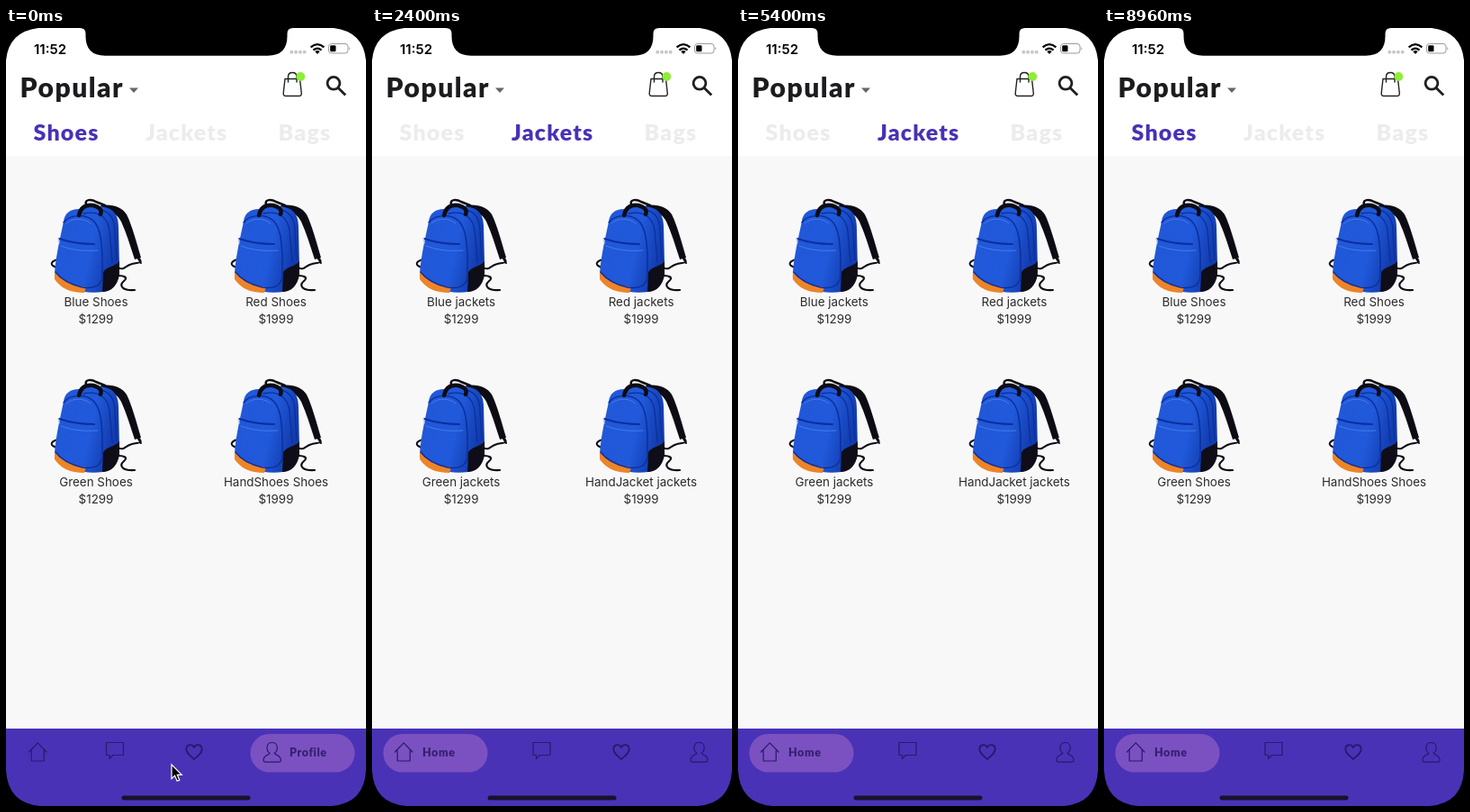
An HTML page for the animation above (9 s loop, 400 px wide and 864 px high).

```html
<!DOCTYPE html>
<html lang="en">
<head>
<meta charset="utf-8">
<title>Shop app</title>
<style>
  html, body { margin: 0; width: 100%; height: 100%; overflow: hidden; background: #000; }
  svg { display: block; width: 100%; height: 100%; }
  .head { font-family: Lato, "Open Sans", sans-serif; font-weight: 900; letter-spacing: 1.2px; }
  .title { font-size: 30px; letter-spacing: 1.5px; fill: #1c1c1e; }
  .tab { font-size: 25px; fill: #ececed; }
  .tab.on { fill: #4a31b5; }
  .label { font-size: 12.5px; letter-spacing: .6px; fill: #35206f; }
  .item { font: 13.4px Inter, Roboto, sans-serif; fill: #2b2b2b; text-anchor: middle; }
  .clock { font: 600 15px Inter, Roboto, sans-serif; fill: #000; }
  .line { fill: none; stroke-linecap: round; stroke-linejoin: round; }
  .nav .line { stroke: #291a6b; stroke-width: 1.2; }
</style>
</head>
<body>
<svg viewBox="0 0 400 864">
  <defs>
    <linearGradient id="cloth" x1="0" x2="1" y2=".3">
      <stop stop-color="#2158d8"/><stop offset=".65" stop-color="#2059da"/><stop offset="1" stop-color="#123cae"/>
    </linearGradient>
    <clipPath id="body"><rect y="142" width="400" height="636"/></clipPath>

    <!-- Backpack, centred on x = 0 -->
    <g id="pack">
      <g class="line" stroke="#0d0c14">
        <path stroke-width="2.5" d="M-11 196C-13 190-5 190 0 193L10 197"/>
        <path stroke-width="2" d="M48 256C53 262 46 260 40 262 32 264 31 270 25 266M45 253L50 261"/>
        <path stroke-width="2.2" d="M25 275C31 275 36 277 31 281 24 287 31 292 43 291"/>
        <path stroke-width="2" d="M-41 257C-46 257-52 261-48 264L-44 266"/>
      </g>
      <path fill="#0d0c14" d="M5 197C18 195 29 199 34 207 40 219 45 238 50 255L43 257C38 242 34 228 28 215 24 207 17 203 8 203Z"/>
      <path fill="url(#cloth)" d="M-36 215C-35 206-29 201-19 201-8 197 4 197 13 200 22 203 25 211 25 222L26 264C26 280 21 290 8 293-10 295-31 293-46 276-46 260-41 238-36 215Z"/>
      <path fill="#0e0d18" d="M8 271C13 264 20 266 26 259L26 274C24 286 17 293 7 293Z"/>
      <path fill="#ed8427" d="M-46 270C-40 279-30 284-11 288L-13 294C-29 294-39 289-46 279Z"/>
      <g class="line" stroke="#0c2f9e">
        <path stroke-width="1.5" d="M-36 216C-30 207-12 206-3 214 5 222 6 236 7 252L7 276C6 287-4 290-15 288-28 285-39 279-45 271"/>
        <path stroke-width="1.3" d="M-14 206C4 202 13 211 15 225L18 260M5 202C16 204 21 212 21 226L23 258"/>
        <path stroke-width="2" d="M-41 234C-29 238-16 240-2 240"/>
        <path stroke-width="1" stroke="#477de8" d="M-33 217C-25 210-13 211-6 217M-39 242C-26 247-13 248 2 247"/>
      </g>
      <path class="line" stroke="#0d0c14" stroke-width="4.5" d="M-19 208C-17 199-11 196-3 197 4 199 7 202 5 207"/>
      <path class="line" stroke="#c7d1e8" stroke-width="1.3" d="M-42 234L-41 239"/>
    </g>
  </defs>

  <rect width="400" height="864" fill="#fff"/>
  <rect y="142" width="400" height="636" fill="#f8f8f8"/>
  <g clip-path="url(#body)"><g id="pages"></g></g>

  <!-- Status bar -->
  <text class="clock" x="31" y="28.5">11:52</text>
  <g fill="#c6c6c8">
    <rect x="315.5" y="25" width="3.6" height="3.6" rx="1"/><rect x="320.3" y="25" width="3.6" height="3.6" rx="1"/>
    <rect x="325.1" y="25" width="3.6" height="3.6" rx="1"/><rect x="329.9" y="25" width="3.6" height="3.6" rx="1"/>
  </g>
  <g class="line" stroke="#000" stroke-width="2.3" style="stroke-linecap:butt">
    <path d="M338.6 21.4Q346 14.8 353.4 21.4M341.5 24.6Q346 20.6 350.5 24.6"/>
  </g>
  <path d="M343.4 26.2Q346 24 348.6 26.2L346 29Z"/>
  <rect x="358.5" y="17.5" width="21.5" height="10.5" rx="3" fill="none" stroke="#9b9b9b"/>
  <rect x="360.2" y="19.2" width="6.3" height="7.1" rx="1.4"/>
  <path d="M381.4 21Q383.4 22.8 381.4 24.6Z" fill="#9b9b9b"/>

  <!-- Header -->
  <text class="head title" x="15.5" y="77">Popular</text>
  <path d="M137 66.5H147L142 72Z" fill="#666"/>
  <g class="line" stroke="#222" stroke-width="1.4">
    <path d="M310 56.5H326.5L328.3 72.5Q328.5 75.5 325.5 75.5H311Q308 75.5 308.2 72.5Z"/>
    <path d="M313.5 60V54Q313.5 49.5 318.2 49.5T323 54V60"/>
  </g>
  <circle cx="327.3" cy="54" r="4.9" fill="#8cee35"/>
  <g class="line" stroke="#1f1f1f" stroke-width="2.8" style="stroke-linecap:butt">
    <circle cx="364" cy="61.3" r="6.9"/><path d="M368.8 66.2L377.2 74.6"/>
  </g>
  <g id="tabs" class="head">
    <text class="tab" x="30.5" y="125">Shoes</text>
    <text class="tab" x="155" y="125">Jackets</text>
    <text class="tab" x="302.5" y="125">Bags</text>
  </g>

  <!-- Bottom navigation -->
  <rect y="778" width="400" height="86" fill="#4a32b7"/>
  <g class="nav">
    <rect id="homePill" x="12.5" y="784" height="42.5" rx="21.2" fill="#7b51c1"/>
    <rect id="userPill" y="784" height="42.5" rx="21.2" fill="#7b51c1"/>
    <path class="line" d="M25.5 804L35.3 793.8 45 804M28.2 801.5V814H42.3V801.5"/>
    <path id="chat" class="line" d="M-9.5 793.5H9.5V807.5H-2L-6 811.5V807.5H-9.5Z"/>
    <path id="heart" class="line" style="stroke-width:1.8" d="M0 812C-5 808-8.7 805-8.7 801 -8.7 795.5-2.5 794.5 0 799 2.5 794.5 8.7 795.5 8.7 801 8.7 805 5 808 0 812Z"/>
    <path id="user" class="line" d="M0 793.5C-7.5 793.5-6.5 803-2.6 805.3-3 807.5-9.6 807-9.6 813Q-9.6 815.2-7.5 815.2H7.5Q9.6 815.2 9.6 813C9.6 807 3 807.5 2.6 805.3 6.5 803 7.5 793.5 0 793.5Z"/>
    <text id="homeLabel" class="head label" x="56" y="809">Home</text>
    <text id="userLabel" class="head label" x="315" y="809">Profile</text>
  </g>
  <rect x="128.5" y="852.5" width="143" height="5" rx="2.5" fill="#19122a"/>

  <!-- Pointer -->
  <g id="pointer">
    <circle id="ring" r="20" fill="#fff" fill-opacity=".35" stroke="#000" stroke-width="3"/>
    <path transform="translate(0 -1) scale(1.1)" d="M0 0V14.2L3.2 11.2 5.6 16.6 8 15.6 5.7 10.3H10.2Z" fill="#000" stroke="#fff" stroke-width="1.1"/>
  </g>

  <!-- Phone frame -->
  <path d="M0 0H400V36Q397 4 364 0H36Q3 4 0 36ZM0 824Q2 861 38 864H0ZM400 824Q398 861 362 864H400Z"/>
  <path d="M82 0Q88.5 0 88.5 6V9Q88.5 30.7 110 30.7H291Q312.5 30.7 312.5 9V6Q312.5 0 319 0Z"/>
</svg>

<script>
const LOOP = 9000, WIDTH = 400;
const $ = id => document.getElementById(id);
const clamp = v => Math.min(1, Math.max(0, v));
const smooth = v => v * v * (3 - 2 * v);
const mix = (a, b, k) => a + (b - a) * k;

// Pointer waypoints: time, x, y
const path = [
  [0, 184, 819], [600, 40, 808], [850, 40, 808], [1500, 83, 683], [1760, 83, 683],
  [1915, 3, 680], [2050, -30, 680], [2550, -30, 672], [2850, 130, 668], [2960, 130, 668],
  [3130, 30, 664], [3250, -30, 662], [3700, -30, 660], [4200, 229, 643], [4450, 229, 643],
  [4800, 310, 646], [5020, 395, 648], [5100, 430, 648], [5700, 430, 650], [6050, 300, 650],
  [6150, 300, 650], [6350, 396, 652], [6900, 396, 652], [7050, 430, 655], [LOOP, 430, 655]
];
const swipes = [
  { press: 1760, release: 1915, from: 0, to: 1 },
  { press: 2960, release: 3130, from: 1, to: 2 },
  { press: 4800, release: 5020, from: 2, to: 1 },
  { press: 6150, release: 6350, from: 1, to: 0 }
];
const TAP = 700;

function pointerAt(t) {
  const i = path.findIndex(p => p[0] > t);
  const [t0, x0, y0] = path[i - 1], [t1, x1, y1] = path[i];
  const k = smooth((t - t0) / (t1 - t0));
  return [mix(x0, x1, k), mix(y0, y1, k)];
}

// Remaining distance of a lightly underdamped spring, 1 at the start
function spring(ms) {
  const s = ms / 1000, decay = 11, freq = 10.47;
  return Math.exp(-decay * s) * (Math.cos(freq * s) + decay / freq * Math.sin(freq * s));
}

function pageAt(t) {
  const s = swipes.filter(w => w.press <= t).pop();
  if (!s) return 0;
  const dragged = s.from - (pointerAt(Math.min(t, s.release))[0] - pointerAt(s.press)[0]) / WIDTH;
  return t < s.release ? dragged : s.to + (dragged - s.to) * spring(t - s.release);
}

function activeTab(t) {
  const s = swipes.filter(w => w.release <= t).pop();
  return s ? s.to : 0;
}

const isPressed = t => Math.abs(t - TAP) < 70 ||
  swipes.some(s => t >= s.press - 60 && t < s.release);

function buildPages() {
  const kinds = [["Shoes", "HandShoes"], ["jackets", "HandJacket"], ["Pouch", "HandBag"]];
  $("pages").innerHTML = kinds.map(([kind, hand], page) =>
    ["Blue", "Red", "Green", hand].map((name, i) => {
      const x = page * WIDTH + 100 + i % 2 * 200, y = (i >> 1) * 200;
      return `<g transform="translate(${x} ${y})"><use href="#pack"/>
        <text class="item" y="309">${name} ${kind}</text>
        <text class="item" y="328">$${i % 2 ? 1999 : 1299}</text></g>`;
    }).join("")).join("");
}

function drawNav(t) {
  const k = smooth(clamp((t - TAP) / 300));
  const place = (id, a, b) => $(id).setAttribute("transform", `translate(${mix(a, b, k)} 0)`);
  const userWidth = mix(116, 42, k);
  $("homePill").setAttribute("width", mix(42, 116, k));
  $("userPill").setAttribute("width", userWidth);
  $("userPill").setAttribute("x", 387.5 - userWidth);
  for (const part of ["Pill", "Label"]) {
    $("home" + part).setAttribute("opacity", k);
    $("user" + part).setAttribute("opacity", 1 - k);
  }
  place("chat", 121, 188.5);
  place("heart", 209, 277);
  place("user", 295.7, 363.5);
}

function draw(t) {
  const [x, y] = pointerAt(t), tab = activeTab(t);
  $("pages").setAttribute("transform", `translate(${-pageAt(t) * WIDTH} 0)`);
  [...$("tabs").children].forEach((el, i) => el.classList.toggle("on", i === tab));
  drawNav(t);
  $("pointer").setAttribute("transform", `translate(${x} ${y})`);
  $("ring").setAttribute("visibility", isPressed(t) ? "visible" : "hidden");
}

buildPages();
const start = performance.now();
function tick() {
  draw(Math.max(0, performance.now() - start) % LOOP);
  requestAnimationFrame(tick);
}
tick();
</script>
</body>
</html>
```
